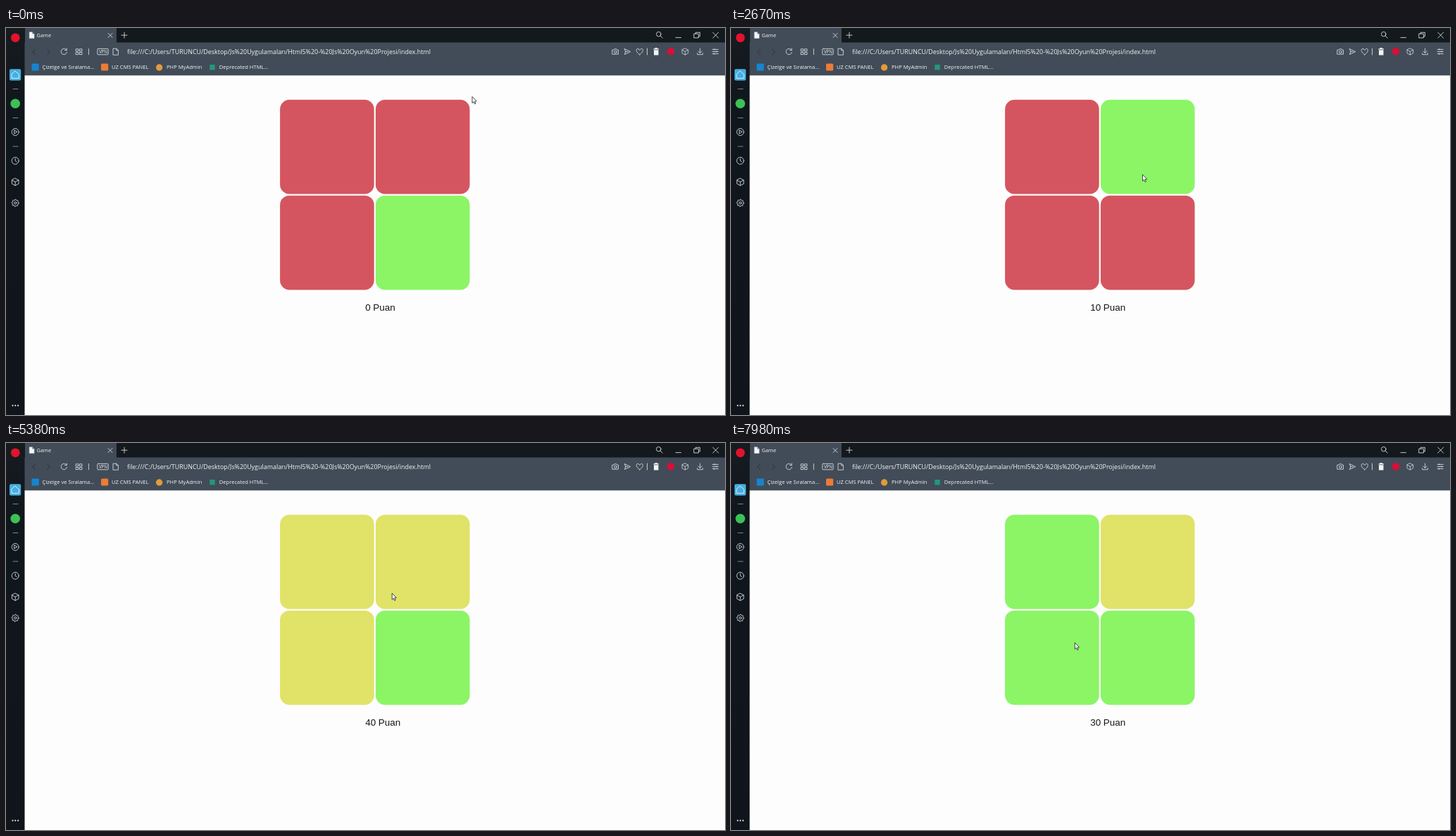
An HTML page for the animation above (8 s loop, 1021 by 549 pixels).

```html
<!DOCTYPE html>
<html lang="tr">
<head>
<meta charset="utf-8">
<title>Game</title>
<style>
  html, body { margin: 0; width: 100%; height: 100%; overflow: hidden; background: #fdfdfd; }
  svg { display: block; width: 1021px; height: 549px; }
  text { font-family: "Open Sans", "Noto Sans", sans-serif; fill: #f2f4f5; white-space: pre; }
  .mark { font-size: 7.6px; }
  #score { font: 13.4px "Liberation Sans", Arial, sans-serif; fill: #151515; }
  .line { fill: none; stroke: #d3d8dc; stroke-width: .9; stroke-linecap: round; stroke-linejoin: round; }
  .dim { stroke: #262f38; }
</style>
</head>
<body>
<svg viewBox="0 0 1021 549" xmlns="http://www.w3.org/2000/svg">
  <defs>
    <linearGradient id="side" x2="0" y2="1">
      <stop stop-color="#161b20"/><stop offset=".2" stop-color="#10171c"/><stop offset="1" stop-color="#10151b"/>
    </linearGradient>
    <path id="box" d="M0-5 4.8-2.5V2.7L0 5.2-4.8 2.7V-2.5ZM-4.8-2.5 0 0 4.8-2.5M0 0V5.2"/>
    <path id="page" d="M-3.4-4.5H1L3.6-1.9V4.5H-3.4ZM1-4.5V-1.9H3.6"/>
  </defs>
  <rect width="1021" height="549" fill="#fdfdfd"/>

  <!-- browser chrome -->
  <rect width="1021" height="21" fill="#14191e"/>
  <rect x="26" y="20.5" width="995" height="46.8" fill="#414c58"/>
  <rect x="27" width="130" height="22" fill="#414c58"/>
  <rect width="26.5" height="549" fill="url(#side)"/>

  <!-- tab strip -->
  <use href="#page" x="36.5" y="10.2" fill="#f5f6f7" stroke="#aab2b9" stroke-width=".5"/>
  <text x="43.6" y="13" font-size="7.4">Game</text>
  <path class="line" d="M145 7.5 151 13.5M151 7.5 145 13.5M164 10.2H172M168 6.2V14.2"/>
  <g class="line">
    <circle cx="926.8" cy="8.7" r="3.3"/><path d="M929.3 11.2 932.2 14.2"/>
    <path d="M951 13.6H958.5M977.2 8.2H983.4V14H977.2ZM979.2 8V6.3H985.4V12H983.6M1003.7 6.2 1011.7 14.2M1011.7 6.2 1003.7 14.2"/>
  </g>

  <!-- address bar -->
  <path class="line dim" d="M41.6 29.8 37.6 33.6 41.6 37.4M58.6 29.8 62.6 33.6 58.6 37.4"/>
  <g class="line">
    <path d="M85.8 31A4.2 4.2 0 1 0 86.5 34.4M86.3 28.9V31.6H83.5"/>
    <path d="M99.5 29.8H102.8V32.8H99.5ZM104.7 29.8H108V32.8H104.7ZM99.5 34.6H102.8V37.6H99.5ZM104.7 34.6H108V37.6H104.7Z"/>
    <path d="M117.4 29.5V37.7"/>
    <rect x="129.8" y="29.4" width="15.4" height="8.4" rx="1"/>
    <use href="#page" x="155.8" y="33.7"/>
  </g>
  <text x="131.9" y="36" font-size="6.2">VPN</text>
  <text x="172" y="36.8" font-size="8.92">file:///C:/Users/TURUNCU/Desktop/Js%20Uygulamaları/Html5%20-%20Js%20Oyun%20Projesi/index.html</text>
  <g class="line">
    <path d="M861.2 31.2H863.2L864 29.8H867L867.8 31.2H869.5V37.2H861.2Z"/><circle cx="865.4" cy="34" r="1.8"/>
    <path d="M878.4 29.7 886.8 33.6 878.4 37.5 879.8 33.6ZM879.8 33.6H883"/>
    <path d="M899.8 37.8C892.5 32.7 895.3 28.4 898 29.7Q899.2 30.2 899.8 31.6 900.4 30.2 901.6 29.7C904.3 28.4 907.1 32.7 899.8 37.8Z"/>
    <path d="M910.5 29V38"/>
    <use href="#box" x="964.4" y="33.4" transform="translate(96.4 3.3) scale(.9)"/>
    <path d="M985.6 29V35.3M982.9 32.8 985.6 35.5 988.3 32.8M981.8 35.7V37.7H989.4V35.7"/>
    <path d="M1003.2 30.4H1011.3M1003.2 33.5H1011.3M1003.2 36.6H1011.3M1006 29.6V31.2M1009 32.7V34.3M1005.5 35.8V37.4"/>
  </g>
  <path fill="#f3f4f5" d="M919.4 29.2H921.6V28H924.8V29.2H927V30.6H919.4ZM920 31.3H926.5V38.6H920Z"/>
  <circle cx="944" cy="33.3" r="5.3" fill="#d80f35"/>

  <!-- bookmarks -->
  <rect x="36.5" y="50.4" width="10.2" height="10.2" rx="1" fill="#1685cf"/>
  <rect x="135" y="50.4" width="10.2" height="10.2" rx="1.5" fill="#ee7b35"/>
  <circle cx="217.6" cy="56" r="4.7" fill="#e39a3d"/>
  <rect x="289.3" y="52" width="7.4" height="7.4" fill="#23987a"/>
  <g class="mark">
    <text class="mark" x="51.6" y="58.3">Çizelge ve Sıralama...</text>
    <text class="mark" x="150" y="58.3">UZ CMS PANEL</text>
    <text class="mark" x="228" y="58.3">PHP MyAdmin</text>
    <text class="mark" x="302.8" y="58.3">Deprecated HTML...</text>
  </g>

  <!-- sidebar -->
  <circle cx="13.3" cy="13.8" r="6.4" fill="#e3122d"/>
  <rect x="5" y="58.2" width="16.2" height="16.4" rx="2" fill="#46aee0"/>
  <path class="line" style="stroke:#f0f8fc" d="M13.1 61.2 18.3 65.6V71.3H8V65.6Z"/>
  <circle cx="13.2" cy="107.2" r="6.8" fill="#3cc254"/>
  <path class="line" style="stroke:#8b9298" d="M10 86.5H17M10 127.5H17M10 168H17"/>
  <g class="line">
    <circle cx="13.2" cy="147.5" r="5"/><path d="M11.7 145.1V149.9L15.7 147.5Z"/>
    <circle cx="13.2" cy="188.3" r="5"/><path d="M13.2 185.2V188.5L15.3 189.8"/>
    <use href="#box" x="13.2" y="218.3"/>
    <path id="gear"/><circle cx="13.2" cy="248.2" r="1.6"/>
  </g>
  <g fill="#e8ebed"><circle cx="9.5" cy="535.6" r="1.1"/><circle cx="13.3" cy="535.6" r="1.1"/><circle cx="17.1" cy="535.6" r="1.1"/></g>

  <!-- game -->
  <g id="tiles"></g>
  <text id="score" x="510.2" y="401.2"></text>
  <path id="cursor" d="M0 0V9.2L2.1 7.3 3.5 10.5 5 9.8 3.6 6.8 6.2 6.5Z" fill="#fff" stroke="#26262c" stroke-width=".85" stroke-linejoin="round"/>
</svg>
<script>
const LOOP = 8000;
const RED = '#d4555f', GREEN = '#8bf566', BLUE = '#69aee1', YELLOW = '#e0e368';
const $ = id => document.getElementById(id);

// start time, points, common colour, odd colour, odd tile
const rounds = [
  [0, 0, RED, GREEN, 3],
  [2060, 10, RED, GREEN, 1],
  [3080, 20, RED, GREEN, 0],
  [3880, 30, RED, BLUE, 0],
  [4870, 40, YELLOW, GREEN, 3],
  [5720, 50, GREEN, YELLOW, 1],
  [7810, 30, GREEN, YELLOW, 1]
];

// time, x, y of the pointer tip
const path = [
  [0, 662, 97.3], [140, 662, 97.3], [940, 648, 170], [1600, 597, 291],
  [1940, 595.3, 292.3], [2300, 595, 292], [2850, 581, 180], [3270, 580.3, 177.6],
  [3400, 575, 178], [3800, 489, 191], [3980, 492, 193], [4410, 538.3, 207.8],
  [4530, 538, 208], [4820, 499, 197], [4950, 501, 198], [5380, 548.2, 213],
  [5660, 597, 298], [5980, 597, 299], [6500, 566, 291], [7080, 517.3, 280],
  [7550, 490, 283], [8000, 488.3, 283.2]
];

const at = (list, t) => list.findLastIndex(k => k[0] <= t);

const tiles = [0, 1, 2, 3].map(i => {
  const r = document.createElementNS('http://www.w3.org/2000/svg', 'rect');
  const set = { x: 389.1 + i % 2 * 135.8, y: 101.8 + (i >> 1) * 135.9, width: 133.6, height: 133.7, rx: 13.3 };
  for (const k in set) r.setAttribute(k, set[k]);
  return $('tiles').appendChild(r);
});

const teeth = Array.from({ length: 32 }, (_, i) => {
  const a = i * Math.PI / 16, r = i % 4 < 2 ? 5.1 : 3.9;
  return (13.2 + r * Math.cos(a)).toFixed(2) + ' ' + (248.2 + r * Math.sin(a)).toFixed(2);
});
$('gear').setAttribute('d', 'M' + teeth.join('L') + 'Z');

function draw(t) {
  const [, points, base, odd, spot] = rounds[at(rounds, t)];
  tiles.forEach((r, i) => r.setAttribute('fill', i === spot ? odd : base));
  $('score').textContent = points + ' Puan';

  const i = Math.min(at(path, t), path.length - 2);
  const [t0, x0, y0] = path[i], [t1, x1, y1] = path[i + 1];
  const p = (t - t0) / (t1 - t0), e = p * p * (3 - 2 * p);
  $('cursor').setAttribute('transform', `translate(${x0 + (x1 - x0) * e} ${y0 + (y1 - y0) * e})`);
}

const start = performance.now();
function tick() {
  draw((performance.now() - start) % LOOP);
  requestAnimationFrame(tick);
}
draw(0);
requestAnimationFrame(tick);
</script>
</body>
</html>
```
